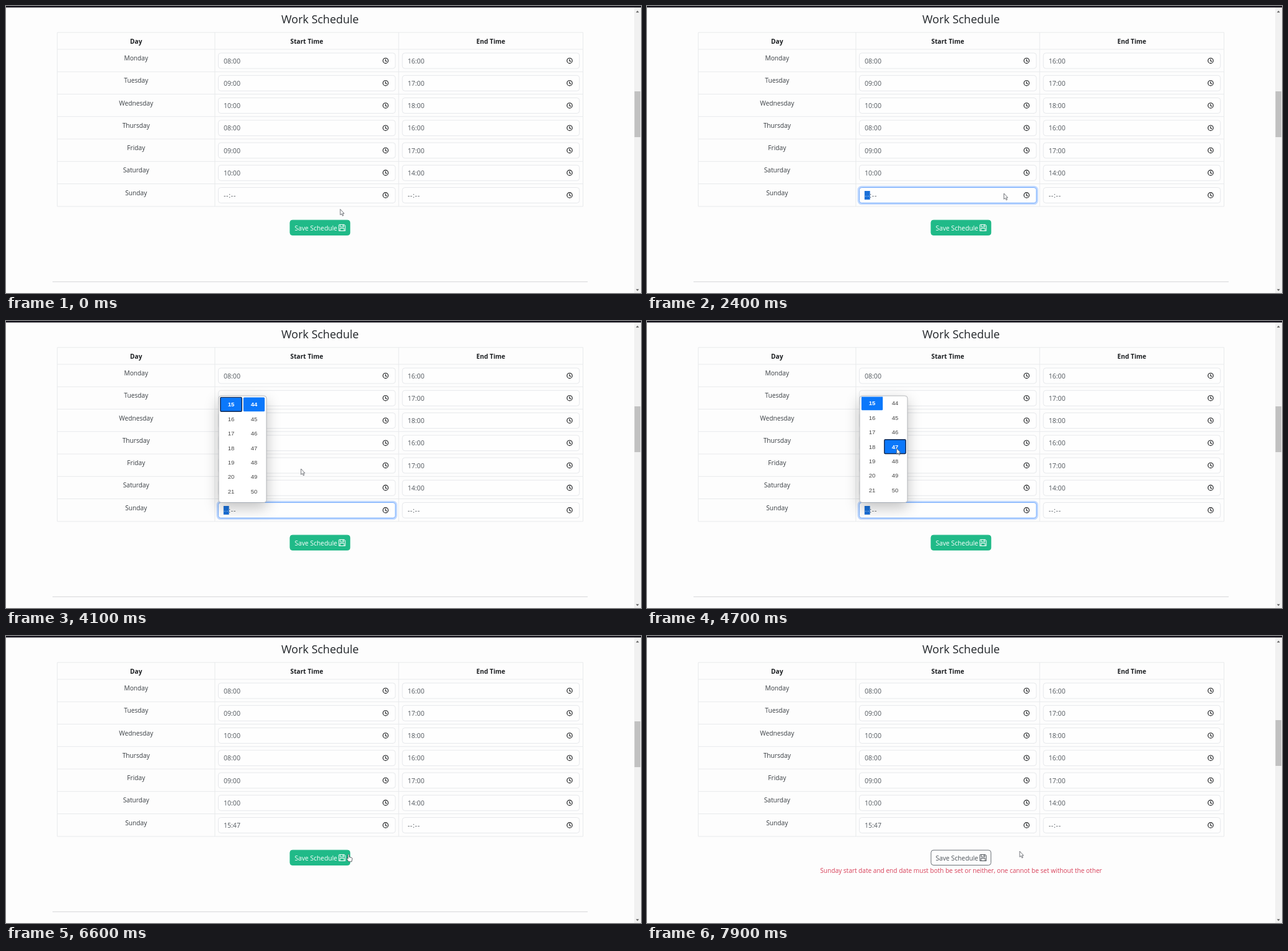
An HTML page for the animation above (8000 ms loop, 1024 px wide and 464 px high).

```html
<!DOCTYPE html>
<html lang="en">
<head>
<meta charset="utf-8">
<title>Work Schedule</title>
<style>
  html, body { margin: 0; width: 100%; height: 100%; overflow: hidden; background: #fdfdfd; }
  svg { display: block; width: 100vw; height: 100vh; font-family: "Open Sans", "Noto Sans", sans-serif; }
  .title { font-size: 18px; font-weight: 500; fill: #212529; }
  .head { font-size: 10.2px; font-weight: 700; fill: #1b1e21; }
  .day { font-size: 10.2px; fill: #383d42; }
  .time { font-size: 10.6px; fill: #50565c; }
  .blank { letter-spacing: .75px; }
  .grid { fill: none; stroke: #e8eaec; }
  .input { fill: #fefefe; stroke: #e6e8eb; }
  .clock { fill: none; stroke: #17191b; stroke-width: 1.15; }
  .error { font-size: 10.12px; fill: #d8415a; }
  .option { font: 9.5px "Liberation Sans", Arial, sans-serif; fill: #484848; }
  .chosen { font-weight: 700; fill: #fff; }
  .panel { fill: #fff; stroke: #a5a8ab; stroke-width: .8; filter: drop-shadow(0 8px 11px rgba(0,0,0,.24)); }
  .middle { text-anchor: middle; }
</style>
</head>
<body>
<svg id="stage" viewBox="0 0 1024 464" preserveAspectRatio="none"></svg>
<script>
const LOOP = 8000, STEP = 100;
const stage = document.getElementById('stage');

function add(parent, tag, attrs = {}, text) {
  const node = document.createElementNS('http://www.w3.org/2000/svg', tag);
  for (const key in attrs) node.setAttribute(key, attrs[key]);
  if (text !== undefined) node.textContent = text;
  parent.append(node);
  return node;
}
const group = (parent = stage) => add(parent, 'g');
const rect = (parent, x, y, width, height, attrs) =>
  add(parent, 'rect', { x, y, width, height, ...attrs });
const label = (parent, x, y, cls, text) => add(parent, 'text', { x, y, class: cls }, text);
const path = (parent, d, attrs) => add(parent, 'path', { d, ...attrs });
const show = (node, on) => node.setAttribute('display', on ? 'inline' : 'none');

// Page frame and scrollbar
rect(stage, 0, 0, 1024, 464, { fill: '#fdfdfd' });
rect(stage, 1013, 2, 11, 462, { fill: '#f1f1f1' });
const thumb = rect(stage, 1013.5, 138, 9.5, 74, { fill: '#c1c1c1' });
path(stage, 'M1015.8 10.5l2.5-3 2.5 3z', { fill: '#606060' });
path(stage, 'M1015.8 457.8l2.5 3 2.5-3z', { fill: '#606060' });
rect(stage, 0, 0, 1024, 2.4, { fill: '#14121b' });
const divider = rect(stage, 75, 445, 863, 1.5, { fill: '#e1e2e3' });

// Table
const TOP = 70, ROW = 36.25;
const rows = [
  ['Monday', '08:00', '16:00'], ['Tuesday', '09:00', '17:00'],
  ['Wednesday', '10:00', '18:00'], ['Thursday', '08:00', '16:00'],
  ['Friday', '09:00', '17:00'], ['Saturday', '10:00', '14:00'],
  ['Sunday', '', '--:--']
];
label(stage, 506.5, 28, 'title middle', 'Work Schedule');
let lines = 'M82.7 42.8H930.5V324H82.7ZM336.8 42.8V324M633.2 42.8V324';
rows.forEach((_, i) => lines += `M82.7 ${TOP + i * ROW}H930.5`);
path(stage, lines, { class: 'grid' });
[[209.7, 'Day'], [485, 'Start Time'], [781.8, 'End Time']]
  .forEach(([x, text]) => label(stage, x, 60.8, 'head middle', text));

function timeInput(x, y, value) {
  const box = rect(stage, x, y + 6, 285.5, 25, { rx: 4, class: 'input' });
  const text = label(stage, x + 8.5, y + 22.7, 'time', value);
  text.classList.toggle('blank', value.includes('-'));
  const cx = x + 269.7, cy = y + 18.4;
  add(stage, 'circle', { cx, cy, r: 4.2, class: 'clock' });
  path(stage, `M${cx} ${cy - 2.7}v2.9l2 1.3`, { class: 'clock' });
  return { box, text };
}
let sunday;
rows.forEach(([day, start, end], i) => {
  const y = TOP + i * ROW;
  label(stage, 209.8, y + 18.2, 'day middle', day);
  sunday = timeInput(342.4, y, start);
  timeInput(639.2, y, end);
});

// Focused state of the Sunday start field
const ring = rect(stage, 341, 292.2, 288.3, 27.6,
  { rx: 5, fill: 'none', stroke: '#0d6efd', 'stroke-opacity': .25, 'stroke-width': 3 });
const picked = group();
rect(picked, 350.8, 299, 8.8, 14, { fill: '#1a70d8' });
label(picked, 350.9, 310.2, 'time blank', '--').style.fill = '#8fbdf0';

// Save button and message
const button = rect(stage, 458, 346.2, 96.7, 24.3, { rx: 4 });
const buttonText = label(stage, 465.5, 362.6, 'day', 'Save Schedule');
buttonText.style.fontSize = '10.3px';
const disk = path(stage,
  'M537.3 353.4H545.6L547.1 354.9V363.5H536.8V353.9ZM539 353.4V357.2H544.8V353.4M543.1 354.2V356M538.7 363.5V359.4H545.2V363.5',
  { fill: 'none', 'stroke-width': 1 });
const error = label(stage, 506.5, 383, 'error middle',
  'Sunday start date and end date must both be set or neither, one cannot be set without the other');

// Time picker
const popup = group();
rect(popup, 343, 121, 77, 172.5, { rx: 4, class: 'panel' });
const clip = add(add(stage, 'defs'), 'clipPath', { id: 'list' });
rect(clip, 344, 122.6, 75, 169);
const list = group(add(popup, 'g', { 'clip-path': 'url(#list)' }));
const options = [];
[[363, 15], [400, 44]].forEach(([x, first], col) => {
  for (let i = 0; i < 7; i++) {
    const y = 134.8 + i * 23.45;
    const back = rect(list, x - 17.2, y - 11.4, 34.4, 22.8,
      { rx: 1.5, fill: '#0b78fb', 'stroke-width': 1.4 });
    options.push({ col, i, back, text: label(list, x, y + 3.4, 'option middle', first + i) });
  }
});

// Pointer
const pointer = group();
const arrow = path(pointer, 'M0 0V9.3L2.1 7.4L3.7 10.8L5.2 10.1L3.7 6.9H6.3Z',
  { fill: '#fff', stroke: '#62666b', 'stroke-width': .9, 'stroke-linejoin': 'round' });
const hand = path(pointer,
  'M0 .8Q1-.6 2 .8V4.5L6 5.4Q7 5.8 6.8 7.2L6 11.8H1L-2 7.4Q-2 6-.9 6.5L0 7.2Z',
  { fill: '#fff', stroke: '#4d5357', 'stroke-width': .9, 'stroke-linejoin': 'round' });

// Pointer tip: time, x, y
const track = [
  [0, 539, 328.5], [200, 539, 325], [900, 539, 298.3], [1300, 539, 298.3],
  [1400, 539, 299], [1900, 539, 299], [2400, 575.6, 303], [2700, 607, 302.5],
  [3500, 607, 302.5], [4000, 500, 250], [4400, 403, 206], [4900, 402.5, 206],
  [5300, 470, 270], [5800, 590, 352], [6000, 590, 352], [6600, 551.5, 353],
  [6800, 546, 353], [7100, 601, 348], [8000, 601, 348]
];
function pointerAt(t) {
  const i = track.findIndex(p => p[0] > t);
  const [t0, x0, y0] = track[i - 1], [t1, x1, y1] = track[i];
  const k = (t - t0) / (t1 - t0);
  return [x0 + (x1 - x0) * k, y0 + (y1 - y0) * k];
}

function draw(t) {
  const focus = t < 6100 ? Math.min(1, Math.max(0, (t - 1500) / 200)) : 0;
  const filled = t >= 4800, chosen = t >= 4600, saved = t >= 7800, outlined = t >= 6800;

  ring.setAttribute('opacity', focus);
  sunday.box.style.stroke = focus ? '#86b7fe' : '';
  sunday.text.textContent = filled ? '15:47' : '--:--';
  sunday.text.classList.toggle('blank', !filled);
  show(picked, focus && !filled);

  show(popup, t >= 2800 && t < 5200);
  list.setAttribute('transform', `translate(0 ${chosen ? -2 : 0})`);
  for (const { col, i, back, text } of options) {
    const on = i === (col && chosen ? 3 : 0);
    show(back, on);
    back.setAttribute('stroke', on && col === +chosen ? '#14284e' : 'none');
    text.classList.toggle('chosen', on);
  }

  button.setAttribute('fill', outlined ? '#fdfdfd' : '#20ba88');
  button.setAttribute('stroke', outlined ? '#6a7077' : '#20ba88');
  buttonText.style.fill = outlined ? '#4a5056' : '#fff';
  disk.setAttribute('stroke', outlined ? '#4a5056' : '#fff');

  show(error, saved);
  show(divider, !saved);
  thumb.setAttribute('y', saved ? 136 : 138);

  const [x, y] = pointerAt(t);
  const over = x >= 457 && x <= 555 && y >= 346 && y <= 371;
  pointer.setAttribute('transform', `translate(${x} ${y})`);
  show(hand, over);
  show(arrow, !over);
}

const began = performance.now();
function tick() {
  const t = (performance.now() - began) % LOOP;
  draw(Math.floor(t / STEP) * STEP);
  requestAnimationFrame(tick);
}
tick();
</script>
</body>
</html>
```
